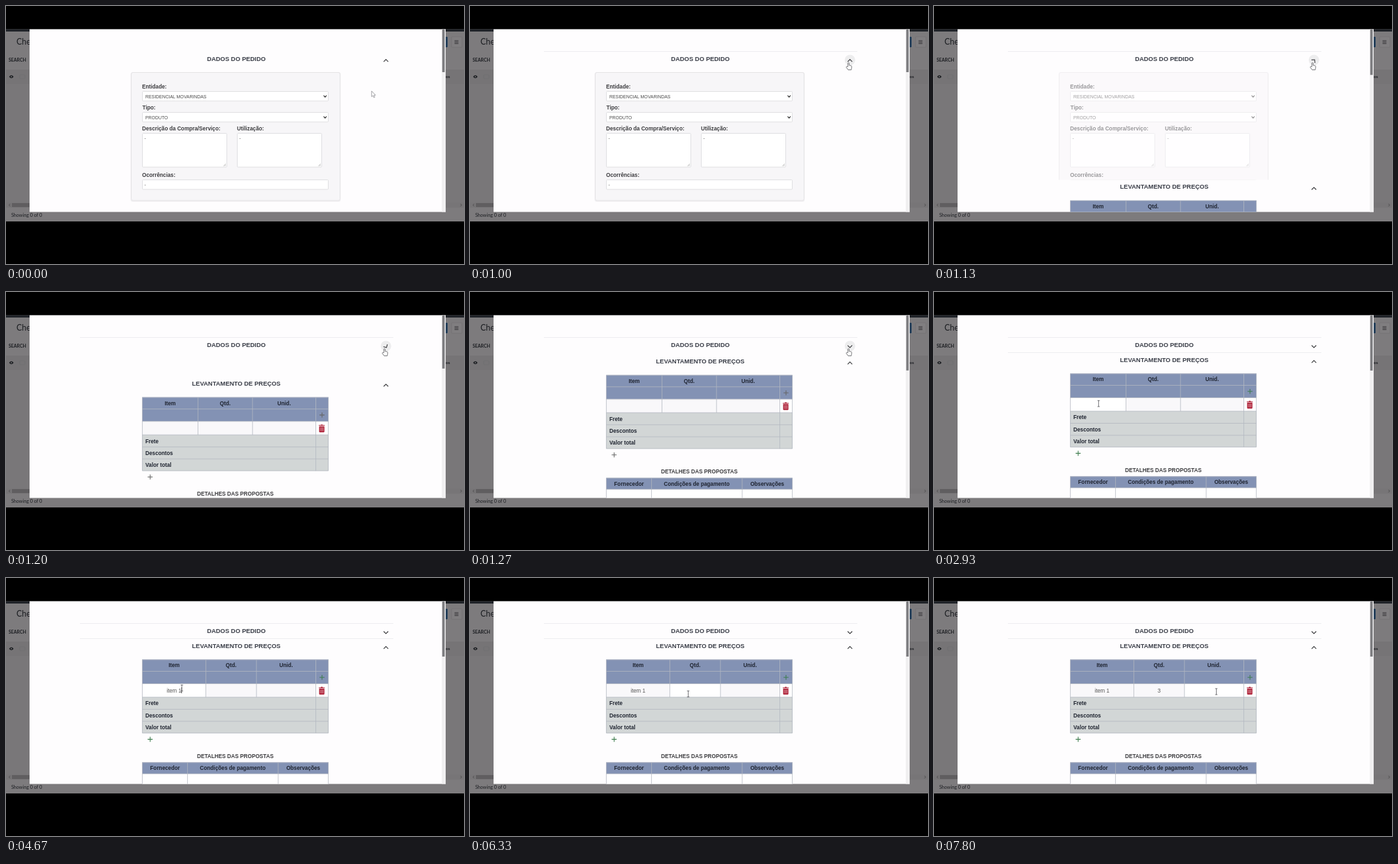
An HTML page that plays this animation: 700 by 394 pixels, repeating every 8000 ms.

```html
<!DOCTYPE html>
<html lang="pt">
<head>
<meta charset="utf-8">
<title>Pedido</title>
<style>
html, body { margin: 0; width: 100%; height: 100%; overflow: hidden; background: #000; }
svg { display: block; width: 100vw; height: 100vh; }
text { font-family: "Liberation Sans", Arial, sans-serif; font-size: 8.25px; fill: #3c3c3f; white-space: pre; transform: translateY(.4px); }
.b { font-weight: bold; }
.m { text-anchor: middle; }
.h { font-size: 9.45px; fill: #393d47; }
.v { font-size: 6.9px; fill: #4a4a4a; }
.th { fill: #1f2430; }
.ui { font-family: Lato, sans-serif; fill: #1c1e22; }
.field { fill: #fff; stroke: #d8d8db; stroke-width: .8; }
.rule { stroke: #ededf0; stroke-width: 1; }
.grid { stroke: #b3b8c0; stroke-width: .8; fill: none; }
.chev { fill: none; stroke: #3a3a3d; stroke-width: 1.15; }
.plus { fill: none; stroke-width: 1.1; }
</style>
</head>
<body>
<svg id="stage" viewBox="0 0 700 394" preserveAspectRatio="none">
  <defs>
    <clipPath id="modal"><rect x="36" y="35.4" width="636" height="279.1"/></clipPath>
    <clipPath id="fold"><rect id="foldBox" x="150" y="93" width="400" height="222"/></clipPath>
  </defs>
  <rect width="700" height="394" fill="#000"/>
  <g id="page"></g>
  <g clip-path="url(#modal)">
    <rect x="36" y="35" width="636" height="280" fill="#fefdfe"/>
    <g clip-path="url(#fold)"><g id="form"></g></g>
    <path id="rule1" class="rule" d="M113 69.5H592"/>
    <path id="rule2" class="rule" d="M113 92.5H592"/>
    <text class="b m h" x="352" y="83.4">DADOS DO PEDIDO</text>
    <circle id="halo" cx="580.7" cy="82.5" r="8" fill="#ededee"/>
    <path id="chev1" class="chev" d="M-3.5 1.8L0 -1.7L3.5 1.8"/>
    <g id="prices"></g>
    <rect x="666" y="35" width="6" height="280" fill="#f1f0f1"/>
    <rect id="thumb" x="666.7" y="35" width="3.8" height="66" fill="#7d7d80"/>
  </g>
  <path id="caret" stroke="#222" stroke-width=".8" d="M0 167V176"/>
  <path id="arrow" fill="#fff" stroke="#8a8a8e" stroke-width=".8" d="M0 .4V9L2 7.3L3.4 10.4L4.9 9.7L3.5 6.7H6Z"/>
  <path id="hand" fill="#fff" stroke="#55555a" stroke-width=".8" stroke-linejoin="round"
    d="M-.9 6.8V1Q0 -.4 .9 1V4.5L3.8 5.1Q5 5.4 4.9 6.8L4.2 11.5H-.6L-3.4 7.6Q-3.2 6 -2 6.5Z"/>
  <path id="beam" fill="none" stroke="#55555a" stroke-width=".8" d="M-1.8 -4.6H1.8M-1.8 4.6H1.8M0 -4.6V4.6"/>
</svg>
<script>
const LOOP = 8000, FOLD = 222;
const $ = id => document.getElementById(id);
const rect = (x, y, x2, y2, attrs) => `<rect x="${x}" y="${y}" width="${x2 - x}" height="${y2 - y}" ${attrs}/>`;
const text = (x, y, s, cls, extra = '') => `<text x="${x}" y="${y}" class="${cls}" ${extra}>${s}</text>`;
const set = (el, attrs) => { for (const k in attrs) el.setAttribute(k, attrs[k]); };
const show = (el, on) => el.setAttribute('opacity', +on);
const move = (el, x, y, more = '') => el.setAttribute('transform', `translate(${x} ${y}) ${more}`);

// Dimmed page behind the dialog
$('page').innerHTML =
  rect(0, 35.6, 700, 329, 'fill="#7d7b7d"') +
  rect(0, 35.6, 700, 39, 'fill="#202329"') +
  rect(0, 97, 700, 119, 'fill="#767476"') +
  rect(0, 119, 700, 300, 'fill="#797779"') +
  rect(0, 300, 700, 308, 'fill="#777577"') +
  rect(9, 301, 40, 307, 'fill="#605e60"') +
  text(16, 58.8, 'Che', 'ui', 'style="font-size:12.4px"') +
  text(4, 85.1, 'SEARCH', 'ui b', 'style="font-size:6.9px"') +
  text(8, 322.1, 'Showing 0 of 0', 'ui', 'style="font-size:7.2px"') +
  text(672, 110, 'os', 'ui b', 'style="font-size:6.4px"') +
  '<path d="M4.8 108Q8.2 103.4 11.6 108Q8.2 112.6 4.8 108Z" fill="#1c1e22"/><circle cx="8.2" cy="108" r="1" fill="#777"/>' +
  rect(21, 105, 29, 111, 'fill="none" stroke="#6d6d70" stroke-width=".6" rx="1"') +
  '<path d="M6.5 302L4.5 304L6.5 306M694.5 302L696.5 304L694.5 306" fill="none" stroke="#444" stroke-width=".8"/>' +
  rect(664, 47, 675, 63, 'fill="#27415c" rx="1"') +
  rect(681, 47, 697, 63, 'fill="#807e80" stroke="#706e70" stroke-width=".6" rx="1"') +
  '<path d="M685.5 53H691.5M685.5 55.2H691.5M685.5 57.4H691.5" stroke="#2c2c2e" stroke-width=".9"/>';

// Order form
const field = (x, y, x2, y2) => rect(x, y, x2, y2, 'class="field" rx="1"');
const select = (y, s) => field(208.5, y, 492.5, y + 14.5) + text(213, y + 9.8, s, 'v') +
  `<path d="M485.5 ${y + 6.2}l2.2 2.4l2.2 -2.4" fill="none" stroke="#222" stroke-width="1.2"/>`;
const area = x => field(x, 194.5, x + 129, 246) + text(x + 3, 204, '-', 'v') +
  `<path d="M${x + 124} 244.5l3.5 -3.5M${x + 126} 244.5l1.5 -1.5" stroke="#888" stroke-width=".6"/>`;
$('form').innerHTML =
  rect(190.5, 101, 511.5, 299, 'fill="#f1f0f2" rx="3"') +
  rect(191.5, 101.5, 510.5, 297, 'fill="#f7f6f8" stroke="#e2e1e4" stroke-width=".9" rx="2.5"') +
  text(208, 125.4, 'Entidade:', 'b') + select(130.5, 'RESIDENCIAL MOVARINDAS') +
  text(208.5, 157.8, 'Tipo:', 'b') + select(162.5, 'PRODUTO') +
  text(208, 190, 'Descrição da Compra/Serviço:', 'b') + area(208.5) +
  text(353, 190, 'Utilização:', 'b') + area(353.5) +
  text(208, 260.8, 'Ocorrências:', 'b') + field(208.5, 265.5, 492.5, 280) + text(211.5, 275, '-', 'v');

// Price survey
const cross = (x, y) => `<path class="plus" d="M${x - 3.8} ${y}h7.6M${x} ${y - 3.8}v7.6"/>`;
const totals = ['Frete', 'Descontos', 'Valor total'].map((s, i) => text(213, 194 + 18.2 * i, s, 'b th')).join('');
$('prices').innerHTML =
  text(352, 106.4, 'LEVANTAMENTO DE PREÇOS', 'b m h') +
  '<path class="chev" transform="translate(580.7 106.3)" d="M-3.5 1.8L0 -1.7L3.5 1.8"/>' +
  rect(208, 124.5, 493, 161.5, 'fill="#8392b4"') +
  rect(208, 161.5, 493, 182, 'fill="#fff"') +
  '<rect id="cell0" y="161.5" height="20.5"/><rect id="cell1" y="161.5" height="20.5"/><rect id="cell2" y="161.5" height="20.5"/>' +
  rect(208, 182, 493, 237, 'fill="#d2d6d6"') + totals +
  '<path class="grid" d="M208 142.5H493M208 161.5H493M208 182H493M208 200.5H493M208 218.8H493M208.4 124.9H492.6V236.8H208.4ZM473.5 125V237"/>' +
  '<path id="cols" class="grid"/>' +
  ['Item', 'Qtd.', 'Unid.'].map((s, i) => text(0, 136, s, 'b m th', `id="head${i}"`)).join('') +
  text(0, 174.8, '', 'm', 'id="item" style="fill:#555"') + text(344, 174.8, '', 'm', 'id="qty" style="fill:#555"') +
  cross(483, 151.7) + cross(220.3, 246.4) +
  '<path fill="#ad1c33" d="M478 168.2V167.2H480.7L481.4 166.3H483.8L484.5 167.2H487.2V168.2ZM478.6 169H486.6V177Q486.6 178 485.6 178H479.6Q478.6 178 478.6 177Z"/>' +
  '<path stroke="#e9c3ca" stroke-width=".7" d="M480.7 170.4V176.4M482.6 170.4V176.4M484.5 170.4V176.4"/>' +
  text(350.5, 274.3, 'DETALHES DAS PROPOSTAS', 'b m') +
  rect(208, 281.5, 493, 299, 'fill="#8392b4"') +
  rect(208, 299, 493, 330, 'fill="#fff"') +
  '<path class="grid" d="M208.4 330V281.9H492.6V330M208 299H493M277.4 282V330M416 282V330"/>' +
  text(243, 293, 'Fornecedor', 'b m th') + text(346.5, 293, 'Condições de pagamento', 'b m th') +
  text(454.3, 293, 'Observações', 'b m th');

const clamp = v => Math.max(0, Math.min(1, v));
const span = (t, a, b) => clamp((t - a) / (b - a));

// cubic-bezier(.4, 0, .2, 1)
function ease(x) {
  let lo = 0, hi = 1;
  for (let i = 0; i < 24; i++) {
    const s = (lo + hi) / 2;
    if (1.2 * s * (1 - s) ** 2 + .6 * s * s * (1 - s) + s ** 3 < x) lo = s; else hi = s;
  }
  return lo * lo * (3 - 2 * lo);
}

// time, x, y of the pointer's hot spot
const route = [
  [0, 558.8, 129.5], [70, 558.8, 129.5], [600, 578.5, 86], [1330, 578.5, 86],
  [1670, 495, 129], [2400, 251.6, 170.4], [3330, 251.6, 170.4], [3460, 268.8, 168],
  [5070, 268.8, 168], [5730, 333.5, 177], [7470, 333.5, 177], [7790, 431.5, 173.5], [LOOP, 431.5, 173.5]
];
function pointer(t) {
  let i = 1;
  while (i < route.length - 1 && route[i][0] <= t) i++;
  const [a, x, y] = route[i - 1], [b, x2, y2] = route[i];
  let k = span(t, a, b);
  k = i === 4 ? k * k : i === 5 ? 1 - (1 - k) ** 1.7 : k * k * (3 - 2 * k);
  return [x + (x2 - x) * k, y + (y2 - y) * k];
}

const keys = [4200, 4270, 4340, 4400, 4540, 4600];
const caretOn = [[2400, 2930], [3470, 4000], [4200, 5200], [5730, 6330], [6870, 7790]];
const foldStart = 1076, foldEnd = foldStart + 225;

function draw(t) {
  const k = ease(span(t, foldStart, foldEnd)), rest = FOLD * (1 - k);

  // Folding section
  $('foldBox').setAttribute('height', rest);
  $('form').setAttribute('opacity', 1 - span(t, foldStart, 1190));
  move($('prices'), 0, rest);
  $('thumb').setAttribute('height', 66 + 19 * k);
  show($('rule1'), t >= 330);
  show($('rule2'), t >= foldEnd);
  move($('chev1'), 580.7, 83.3, `rotate(${180 * k})`);
  $('halo').setAttribute('opacity', span(t, 470, 600) * (1 - span(t, 1390, 1500)));
  $('prices').querySelectorAll('.plus').forEach(p => p.setAttribute('stroke', t < foldEnd ? '#666' : '#3f7d4f'));

  // Typed values and column widths
  const typed = keys.filter(at => t >= at).length;
  $('item').textContent = 'item 1'.slice(0, typed).replace(' ', '\u00a0');
  $('qty').textContent = t >= 7270 ? '3' : '';
  const grow = typed < 5 ? 0 : typed < 6 ? .35 : 1;
  const edges = [208.4, 293.4 + 12 * grow, 376.8 + 6 * grow, 473.5];
  const mid = i => (edges[i] + edges[i + 1]) / 2;
  const active = t < 2400 ? -1 : t < 5730 ? 0 : t < 7700 ? 1 : 2;
  for (let i = 0; i < 3; i++) {
    set($('cell' + i), { x: edges[i], width: edges[i + 1] - edges[i], fill: i === active ? '#fff' : '#f9f8fa' });
    $('head' + i).setAttribute('x', mid(i));
  }
  $('cols').setAttribute('d', `M${edges[1]} 125V182M${edges[2]} 125V182`);
  $('item').setAttribute('x', mid(0));
  $('qty').setAttribute('x', mid(1));

  const box = t < 5730 ? 0 : 1, value = $(box ? 'qty' : 'item');
  const width = value.textContent ? value.getComputedTextLength() : 0;
  move($('caret'), mid(box) + width / 2 + .3, 0);
  show($('caret'), caretOn.some(([a, b]) => t >= a && t < b));

  // Pointer
  const [x, y] = pointer(t);
  const kind = t >= 470 && t < 1450 ? 'hand' : t >= 2100 && y > 162 ? 'beam' : 'arrow';
  for (const id of ['arrow', 'hand', 'beam']) {
    show($(id), id === kind);
    move($(id), x, y);
  }
}

function tick() {
  draw(performance.now() % LOOP);
  requestAnimationFrame(tick);
}
tick();
</script>
</body>
</html>
```
